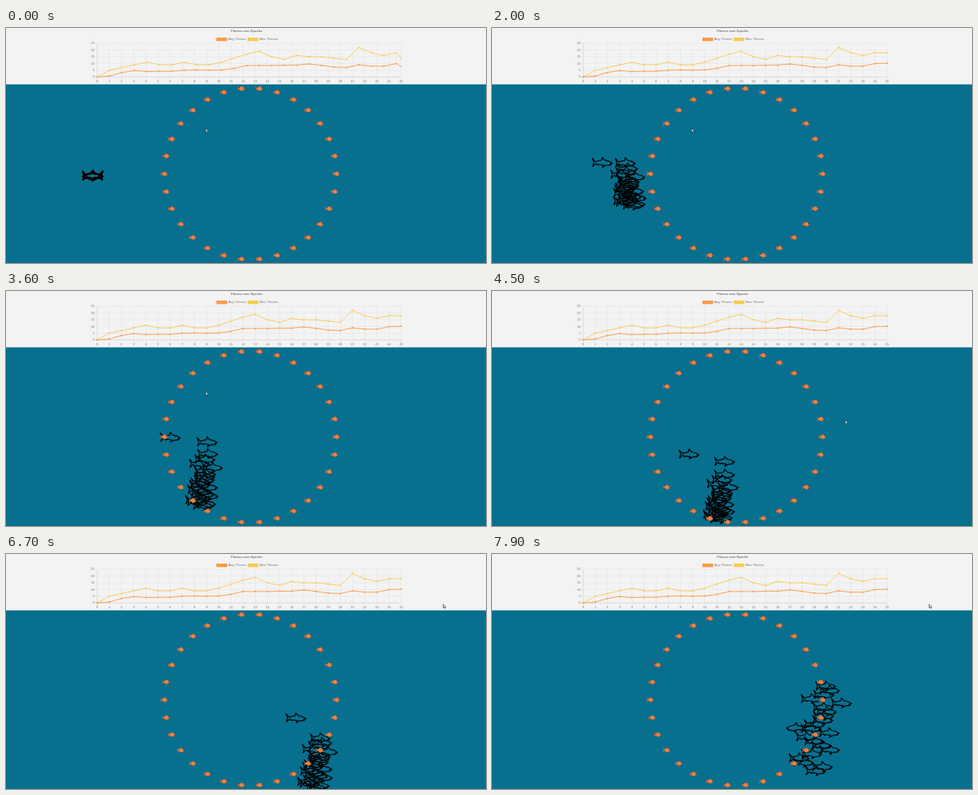
Recreate the animation shown at these times as an HTML page with a canvas. Size 600 by 294 pixels, loop 8000 ms.

```html
<!DOCTYPE html>
<html lang="en">
<head>
<meta charset="utf-8">
<title>Fitness over Epochs</title>
<style>
html, body { margin: 0; width: 100%; height: 100%; overflow: hidden; background: #07708f; }
canvas { display: block; width: 600px; height: 294px; }
</style>
</head>
<body>
<canvas id="stage" width="600" height="294"></canvas>
<script>
const ctx = document.getElementById('stage').getContext('2d');
const LOOP = 8000, STEP = 100;
const FONT = '"Liberation Sans", Arial, sans-serif';
const ORANGE = '#fd9a45', YELLOW = '#f8cb52';

// Chart
const LEFT = 114, RIGHT = 494, BASE = 61.2, UNIT = 1.68;
const avg = [0, .7, 3.3, 4.7, 4, 4.2, 4.2, 5, 5.2, 5, 5.2, 6.4, 8.5, 8.5, 8.5, 8.7, 8.8, 9.7, 8.6, 7.3, 7, 9, 8, 8, 9.9, 10.2];
const max = [0, 5, 7, 9, 11, 9, 9, 11, 9, 9, 11, 14, 17, 19, 15, 13, 16, 15, 15, 14, 13, 22, 18, 16, 18, 18];

function line(x1, y1, x2, y2) {
  ctx.beginPath();
  ctx.moveTo(x1, y1);
  ctx.lineTo(x2, y2);
  ctx.stroke();
}

function label(text, x, y, align, weight = '') {
  ctx.font = `${weight} 4px ${FONT}`;
  ctx.textAlign = align;
  ctx.fillText(text, x, y);
}

function drawGrid() {
  ctx.fillStyle = '#f3f3f3';
  ctx.fillRect(0, 0, 600, 70.5);
  ctx.lineWidth = .6;
  ctx.textBaseline = 'middle';
  ctx.fillStyle = '#707070';
  for (let i = 0; i <= 25; i++) {
    const x = LEFT + i * 15.2;
    ctx.strokeStyle = i ? '#e4e4e4' : '#cccccc';
    line(x, 19.2, x, 63.5);
    label(i, x, 66.6, 'center');
  }
  for (let v = 0; v <= 25; v += 5) {
    const y = BASE - v * UNIT;
    ctx.strokeStyle = v ? '#e4e4e4' : '#cccccc';
    line(LEFT - 3, y, RIGHT, y);
    label(v, LEFT - 3.2, y, 'right');
  }
  label('Fitness over Epochs', 300.8, 3.8, 'center', 'bold');
  label('Avg. Fitness', 278, 14.2, 'left');
  label('Max. Fitness', 317, 14.2, 'left');
  ctx.fillStyle = ORANGE;
  ctx.fillRect(263, 12, 13.5, 4.4);
  ctx.fillStyle = YELLOW;
  ctx.fillRect(302, 12, 13.5, 4.4);
}

function drawSeries(values, color, t) {
  const left = 1 - Math.min(1, (t + 124) / 1000);
  const p = 1 - left ** 4;
  const gap = 380 / 24 + (380 / 25 - 380 / 24) * p;
  const pts = values.map((v, i) => [LEFT + i * gap, BASE - v * UNIT * (i === 25 ? p : 1)]);
  ctx.save();
  ctx.beginPath();
  ctx.rect(LEFT - 2, 15, RIGHT - LEFT + 3, 50);
  ctx.clip();
  ctx.strokeStyle = ctx.fillStyle = color;
  ctx.lineWidth = .9;
  ctx.beginPath();
  pts.forEach(([x, y]) => ctx.lineTo(x, y));
  ctx.stroke();
  for (const [x, y] of pts) {
    ctx.beginPath();
    ctx.arc(x, y, 1, 0, 7);
    ctx.fill();
  }
  ctx.restore();
}

// Ring of fish
const fishPath = new Path2D(
  'M4.5 .3 Q2.6-2 .8-3 L-1.2-2.2 L-2.6-.6 L-4.5-2.5 L-4-.1 L-4.5 2.5 L-2.6 .9 L-.6 2.4 L.4 3.1 Q3 2.2 4.5 .3 Z');
const fishMarks = new Path2D('M2.2-1.7 Q1.4 .2 2 1.8 M-.8-1.9 Q-.4 .2-.9 1.9');

function drawFish(x, y) {
  ctx.save();
  ctx.translate(x, y);
  ctx.fillStyle = '#ee7a38';
  ctx.strokeStyle = '#85533f';
  ctx.lineWidth = .5;
  ctx.fill(fishPath);
  ctx.stroke(fishPath);
  ctx.strokeStyle = '#d8a68c';
  ctx.stroke(fishMarks);
  ctx.fillStyle = '#4a302a';
  ctx.fillRect(2.7, -.8, .8, .8);
  ctx.restore();
}

function drawRing() {
  for (let i = 0; i < 30; i++) {
    const a = i * Math.PI / 15;
    drawFish(305.4 + 107.6 * Math.cos(a), 182.4 + 107.2 * Math.sin(a));
  }
}

// The flock fills a strip from head to tail; side is its half width,
// and a low bias crowds the sharks toward the tail.
const flock = [
  { t: 0, head: [108, 184.4], tail: [108, 184.8], side: .5, bias: 1 },
  { t: 1200, head: [124, 175], tail: [139, 194], side: 9, bias: .8 },
  { t: 2700, head: [213, 169], tail: [206, 247], side: 11, bias: .65 },
  { t: 4500, head: [293, 213], tail: [283, 285], side: 9, bias: .5 },
  { t: 5900, head: [361, 239], tail: [352, 305], side: 9, bias: .6 },
  { t: 6700, head: [396, 230], tail: [385, 292], side: 12, bias: .8 },
  { t: 7900, head: [424, 165], tail: [400, 271], side: 24, bias: 1 }
];
const straggler = [
  [0, 108, 184.6], [1200, 111, 177], [2700, 167, 166], [4500, 246, 204],
  [5900, 320, 222], [6700, 362, 205], [7400, 387, 212], [7900, 380, 217]
];
const COUNT = 21;

let seed = 11;
const rand = () => (seed = seed * 16807 % 2147483647) / 2147483647;
const mix = (a, b, u) => a + (b - a) * u;

const sharks = [straggler];
for (let i = 0; i < COUNT; i++) {
  const rank = i / (COUNT - 1), drift = rand() * 2 - 1;
  sharks.push(flock.map(({ t, head, tail, side, bias }) => {
    const u = rank ** bias;
    const off = side * drift * Math.min(1, .3 + i / 4);
    return [t, mix(head[0], tail[0], u) + off, mix(head[1], tail[1], u)];
  }));
}

function tangent(path, i, axis) {
  if (i === 0) return 0;
  const a = path[i - 1], b = path[Math.min(i + 1, path.length - 1)];
  return (b[axis] - a[axis]) / (b[0] - a[0]);
}

// Smooth cubic through timed points [t, x, y]
function along(path, t, axis) {
  let i = 0;
  while (i < path.length - 2 && t >= path[i + 1][0]) i++;
  const a = path[i], b = path[i + 1], d = b[0] - a[0];
  const s = (t - a[0]) / d, s2 = s * s, s3 = s2 * s;
  return mix(a[axis], b[axis], 3 * s2 - 2 * s3)
    + d * (tangent(path, i, axis) * (s3 - 2 * s2 + s) + tangent(path, i + 1, axis) * (s3 - s2));
}

const sharkPath = new Path2D(
  'M12.6 1 Q8.5-2.3 3.4-2.5 L-.2-6.2 L-.9-2.6 Q-5-2-8.4-.8 L-12.6-5.2 L-10.4 .2 L-12 5.2 L-7.8 1.5 ' +
  'L-5.4 3.6 L-4.4 2.4 Q-1 3.4 2 3.4 L.2 6.2 L5.2 3.6 Q9 3.9 11 2.8 L9.4 2 Z');

function drawShark(path, i, t) {
  const x = along(path, t, 1), y = along(path, t, 2);
  const back = t < 200 ? i % 2 : x < along(path, t - STEP, 1) - .8;
  ctx.save();
  ctx.translate(x + .4, y);
  if (back) ctx.scale(-1, 1);
  ctx.stroke(sharkPath);
  ctx.restore();
}

// Pointer
function ease(t, from, to) {
  const s = Math.min(1, Math.max(0, (t - from) / (to - from)));
  return s * s * (3 - 2 * s);
}

const arrow = new Path2D('M0 0 V4.6 L1.1 3.7 L1.9 5.4 L2.6 5 L1.9 3.4 L3.3 3.3 Z');

function drawPointer(t) {
  const p = ease(t, 3600, 4400), q = ease(t, 4600, 5200);
  ctx.save();
  ctx.translate(249.5 + 192 * p + 105 * q, 125.8 + 36 * p - 99 * q);
  ctx.fillStyle = '#fff';
  ctx.strokeStyle = '#222';
  ctx.lineWidth = .6;
  ctx.fill(arrow);
  ctx.stroke(arrow);
  ctx.restore();
}

function draw(t) {
  ctx.fillStyle = '#07708f';
  ctx.fillRect(0, 0, 600, 294);
  drawGrid();
  drawSeries(max, YELLOW, t);
  drawSeries(avg, ORANGE, t);
  ctx.strokeStyle = '#000';
  ctx.lineWidth = 1.15;
  ctx.lineJoin = 'round';
  sharks.forEach((path, i) => drawShark(path, i, t));
  drawRing();
  drawPointer(t);
}

const start = performance.now();
function tick() {
  const t = (performance.now() - start) % LOOP;
  draw(Math.floor(t / STEP) * STEP);
  requestAnimationFrame(tick);
}
tick();
</script>
</body>
</html>
```
